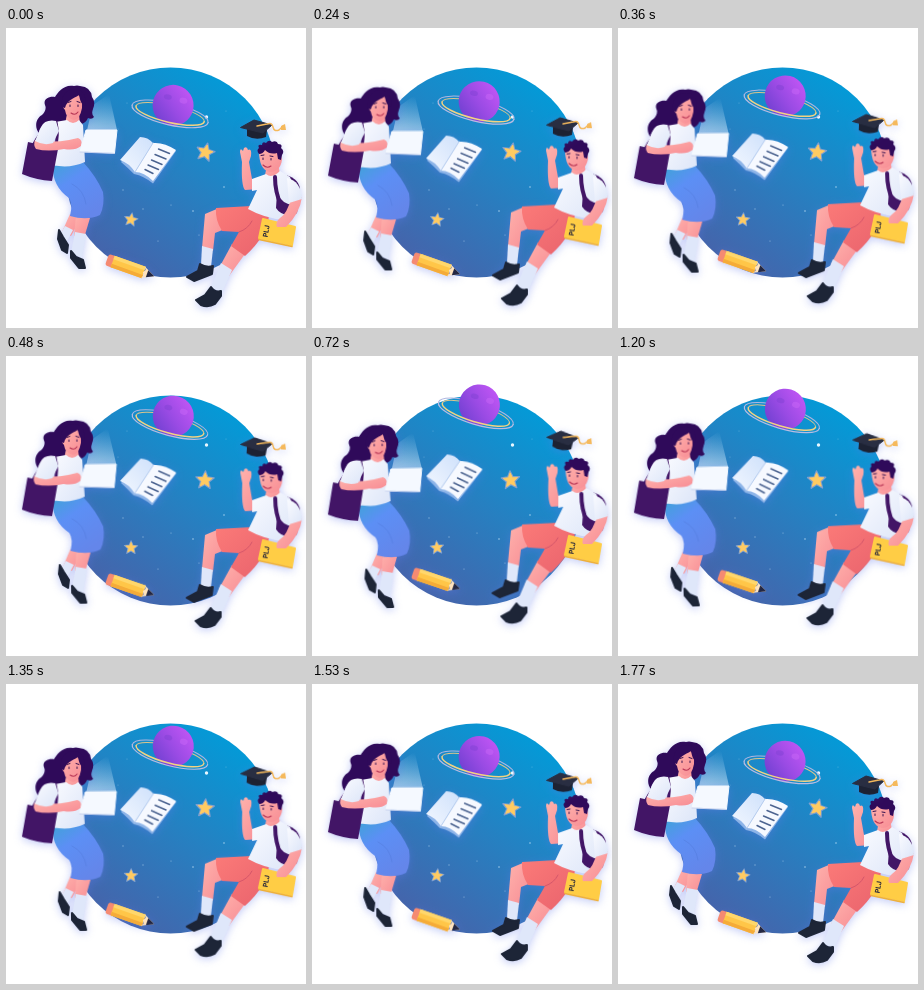
These frames come from a looping animation (300x300 px, 1.8 s). An HTML page:

```html
<!DOCTYPE html>
<html lang="en">
<head>
<meta charset="utf-8">
<title>Floating students</title>
<style>
html, body { margin: 0; width: 100%; height: 100%; overflow: hidden; background: #fff; }
svg { display: block; width: 100vw; height: 100vh; }
.glow { filter: drop-shadow(0 2px 4px rgba(96, 120, 235, .38)); }
.line { fill: none; stroke-linecap: round; stroke-linejoin: round; }
.ink { stroke: #34104f; stroke-width: 1; }
.skin { fill: url(#skin); }
.shoe { fill: #1d2537; stroke: #1d2537; stroke-width: 2; stroke-linejoin: round; }
.sock { fill: #dfe7fa; }
.shirt { fill: url(#cloth); }
.hair { fill: #2f0a5a; }
</style>
</head>
<body>
<svg viewBox="0 0 300 300">
  <defs>
    <linearGradient id="sky" x1=".85" y1=".1" x2=".25" y2=".95">
      <stop offset="0" stop-color="#029bd8"/><stop offset=".5" stop-color="#2680c1"/><stop offset="1" stop-color="#4564ab"/>
    </linearGradient>
    <linearGradient id="skin" x1="0" y1="0" x2="1" y2="1">
      <stop offset="0" stop-color="#ffb2ac"/><stop offset="1" stop-color="#f78c94"/>
    </linearGradient>
    <linearGradient id="cloth" x1="0" y1="0" x2="1" y2="1">
      <stop offset="0" stop-color="#fafbff"/><stop offset="1" stop-color="#dce5f8"/>
    </linearGradient>
    <linearGradient id="skirt" x1="0" y1="0" x2=".6" y2="1">
      <stop offset="0" stop-color="#3fa3d8"/><stop offset=".4" stop-color="#5c8ff5"/><stop offset="1" stop-color="#6486ea"/>
    </linearGradient>
    <linearGradient id="shorts" x1="0" y1="0" x2="1" y2="1">
      <stop offset="0" stop-color="#fb7a78"/><stop offset="1" stop-color="#e9636d"/>
    </linearGradient>
    <linearGradient id="orb" x1=".15" y1=".9" x2=".8" y2=".15">
      <stop offset="0" stop-color="#7341d2"/><stop offset=".5" stop-color="#9a4be4"/><stop offset="1" stop-color="#bb54f2"/>
    </linearGradient>
    <linearGradient id="page" x1="0" y1="1" x2="1" y2="0">
      <stop offset="0" stop-color="#f2f7ff"/><stop offset="1" stop-color="#cfe1fb"/>
    </linearGradient>
    <linearGradient id="beam" x1=".4" y1="1" x2=".55" y2="0">
      <stop offset="0" stop-color="#dff3ff" stop-opacity=".6"/><stop offset="1" stop-color="#bfe4fa" stop-opacity="0"/>
    </linearGradient>
    <g id="star" stroke-linejoin="round">
      <path id="starShape" d="M0-9 2.6-3.1 9-2.6 4.2 1.7 5.6 8 0 4.7-5.6 8-4.2 1.7-9-2.6-2.6-3.1Z" fill="#7f9fce" stroke="#7f9fce" stroke-width="1.5"/>
      <path transform="scale(.8)" d="M0-9 2.6-3.1 9-2.6 4.2 1.7 5.6 8 0 4.7-5.6 8-4.2 1.7-9-2.6-2.6-3.1Z" fill="#ffcb62" stroke="#ffcb62"/>
    </g>
  </defs>

  <circle cx="164.500" cy="144.500" r="105" fill="url(#sky)"/>
  <g id="specks" fill="#d6efff"></g>
  <circle cx="200.500" cy="89" r="1.700" fill="#e8f7ff"/>

  <g id="planet">
    <path class="line" d="M126 86A39 11 0 0 1 204 86" stroke="#aeb6e0"/>
    <path class="line" d="M130 86A35 8.500 0 0 1 200 86" stroke="#d9c48d"/>
    <circle cx="166" cy="77" r="20.500" fill="url(#orb)"/>
    <ellipse cx="159" cy="70" rx="4" ry="2.600" fill="#7a3fd0" opacity=".4"/>
    <ellipse cx="175" cy="70" rx="4" ry="3" fill="#d06bfa" opacity=".4"/>
    <path class="line" d="M126 86A39 11 0 0 0 204 86" stroke="#b9bce2" stroke-width="1.200"/>
    <path class="line" d="M130 86A35 8.500 0 0 0 200 86" stroke="#f2d382" stroke-width="1.500"/>
  </g>

  <g id="bigStar"><use href="#star" x="199.500" y="124"/></g>
  <g id="smallStar"><use href="#star" transform="translate(125 191.500) scale(.74)"/></g>

  <g id="notebook" class="glow">
    <path d="M115 134 134 111Q140 110 146 116 157 116 170 123L147 155.500Q138 148 128 146 121 139 115 134Z" fill="#8db4e8"/>
    <path d="M114 132 134 109Q142 109 147 115L129 144Q123 135 114 132Z" fill="url(#page)"/>
    <path d="M147 115Q158 114 170 122L147 153Q138 144 129 144Z" fill="#f6f9ff"/>
    <path class="line" d="M147 115 129 144" stroke="#b7cdef"/>
    <path class="line" d="M152.500 121 163.500 125.500M149 126.500 160 131M145.500 132 156 136.500M142 137 152.500 141.500M139 141.500 147 145.500" stroke="#4a628f" stroke-width="1.400"/>
  </g>

  <g id="pencil" class="glow">
    <g transform="translate(101 231.500) rotate(19.500)">
      <rect y="-6" width="10" height="12" rx="2.500" fill="#f58a72"/>
      <path d="M6-6H39V6H6Z" fill="#ffc648"/>
      <path d="M6-6H39V-2.500H6Z" fill="#ffd76c"/>
      <path d="M6 2.500H39V6H6Z" fill="#f5ab38"/>
      <path d="M38-6 50 0 38 6 40 3 38 0 40-3Z" fill="#ffe3bd"/>
      <path d="M42.500-3.700 50 0 42.500 3.700Z" fill="#232743"/>
    </g>
  </g>

  <g id="girl">
    <path d="M81 102 87 77 103 66 111 102Z" fill="url(#beam)"/>
    <g class="glow">
      <path class="hair" d="M68 58C58 56 52 64 49 69 42 68 37 72 39 77 41 81 38 85 36 87 30 90 28 99 33 105 33 100 37 98 41 97 48 101 55 100 61 97L75 96Q80 95 82 90 86 92 88 89 85 86 87 81 90 74 86 69 85 59 74 58 71 57 68 58Z"/>
      <path class="skin" d="M64 186 75 190 65 208 56 204Z"/>
      <path class="sock" d="M59 198 67 202 61 213 54 207Z"/>
      <path class="shoe" d="M53 202 57 209 62 217 61 225 56 222 52 211Z"/>
      <path class="skin" d="M70 187 84 190 78 210 68 208Z"/>
      <path class="sock" d="M69 204 80 206 76 230 65 225Z"/>
      <path class="shoe" d="M65 223 70 229 77 232 79 240 73 240 65 230Z"/>
      <path d="M47 138 77 134Q90 148 97 164 99 177 94 187 81 193 64 188 67 176 63 170 46 158 47 138Z" fill="url(#skirt)"/>
      <path class="line" d="M66 156Q78 162 80 176" stroke="#5078d8" opacity=".45"/>
      <path class="skin" d="M61 86H73L74 97 66 101 59 96Z"/>
      <path class="shirt" d="M49 94 61 92Q67 98 73 92L77 97 79 134Q63 141 47 137L50 116Z"/>
      <path d="M22 114 52 121 46 153Q30 152 16 146Z" fill="#421566"/>
      <path class="line" d="M50 94Q53 107 49 121M43 99Q34 104 28 116" stroke="#421566" stroke-width="3"/>
      <path class="skin" d="M29 112Q46 115 63 112L72 110Q77 112 75 118 69 123 58 121 42 124 30 121 27 117 29 112Z"/>
      <path class="shirt" d="M50 93Q39 91 35 99L29 113Q38 118 47 115L53 103Z"/>
      <path class="skin" d="M59 72Q62 64 71 66 77 69 76 80 74 91 68 92 60 90 59 82 55 78 59 72Z"/>
      <path class="hair" d="M56 79C54 67 62 60 70 61 80 63 80 72 79 78 75 76 74 72 73 67 67 71 61 72 59 80Z"/>
      <path class="line ink" d="M64 77V78.500M72 77V78.500M62 74.500 65 73.500M71 73.500 74 74.500"/>
      <path class="line" d="M65 85Q69 88 72 84" stroke="#b83656" stroke-width="1.100"/>
      <path d="M80 102 111 102 108.500 125 74 123.500Z" fill="#f5f9ff" stroke="#f5f9ff" stroke-linejoin="round"/>
      <path class="line" d="M74 124 108.500 125.500" stroke="#c8d3ef"/>
    </g>
  </g>

  <g id="boy" class="glow">
    <path class="skin" d="M226 216 239 226 223 248 213 240Z"/>
    <path class="sock" d="M215 235 226 242 216 265 205 259Z"/>
    <path class="shoe" d="M205 259Q209 265 215 263L215 268 209 276Q202 280 195 277L190 272 199 267Z"/>
    <path class="skin" d="M199 186 213 180 219 201 209 205 207 223 196 220Z"/>
    <path class="sock" d="M196 218 207 221 205 239 195 237Z"/>
    <path class="shoe" d="M194 236Q200 240 207 238L206 246 188 253 181 249 192 243Z"/>
    <path d="M245 178 263 187Q262 207 239 228L225 218 233 204 216 203Q209 192 210 180Z" fill="url(#shorts)"/>
    <path class="line" d="M233 204Q242 201 246 193" stroke="#d4566a"/>
    <path class="skin" d="M236 134 234 124Q234 119 237 123L238 120Q241 118 242 122 246 120 245 128L243 134 246 151 257 151 255 161 239 162Q235 158 236 134Z"/>
    <path d="M280 147Q294 151 294 163L291 185Q283 190 276 185Z" fill="#421566"/>
    <path class="skin" d="M261 137 272 134 274 147 266 151 259 147Z"/>
    <path class="shirt" d="M246 151 260 146Q266 151 274 143L284 149 290 165 278 192Q258 190 242 181L251 162 246 163Z"/>
    <path class="line" d="M269 149Q269 164 275 177" stroke="#421566" stroke-width="4"/>
    <path d="M271 165Q276 176 287 177L286 187Q275 188 270 180Z" fill="#421566"/>
    <path d="M257 191 289 199 286 217 253 210Z" fill="#ffcd45" stroke="#ffcd45" stroke-width="2" stroke-linejoin="round"/>
    <path class="line" d="M253 211.500 286 218.500" stroke="#eeaf39" stroke-width="1.500"/>
    <text transform="translate(261.500 209.500) rotate(-80)" font-family="Inter, 'Liberation Sans', sans-serif" font-size="6.800" font-weight="700" fill="#20213a">PLJ</text>
    <path class="skin" d="M286 168 296 169Q294 185 280 199L271 199Q269 194 274 190 281 186 286 168Z"/>
    <path class="shirt" d="M281 150Q295 153 296 171L283 175Z"/>
    <path class="skin" d="M253 123Q260 117 274 122L276 132Q274 144 264 144 253 142 253 123Z"/>
    <path class="hair" d="M253 126Q250 122 253 120 251 116 256 117 256 113 260 115 263 111 266 114 271 112 272 116 277 116 275 120 279 123 276 127L275 132 272 131 271 125Q264 127 259 122 257 126 253 126Z"/>
    <path class="line ink" d="M257 130V131.500M265 130.500V132M255 127.500 258 127M264 128 267 128.500"/>
    <path class="line" d="M257 137Q261 141 265 138" stroke="#b83656" stroke-width="1.100"/>
  </g>

  <g id="cap" class="glow">
    <path d="M241 99 261 102 260 109Q250 113 241 108Z" fill="#1d2233"/>
    <path d="M234.500 99.500 248 92 266 97 257 105Z" fill="#292e42" stroke="#292e42" stroke-linejoin="round"/>
    <path class="line" d="M251 98 261 96Q266 94 267 99T273 102L277 98" stroke="#f5b95c" stroke-width="1.400"/>
    <path d="M275 98 279 96 280 102 275 102Z" fill="#f5b95c"/>
  </g>
</svg>
<script>
const LOOP = 1800, STEP = 30;
const el = id => document.getElementById(id);

// Each part drifts and tilts between rest and its far pose.
const parts = [
  { id: "planet", x: 165, y: 82, rise: -30.5, from: 13, to: 17 },
  { id: "bigStar", x: 199.5, y: 124, shift: -1, rise: 0, from: 14, to: -5 },
  { id: "smallStar", x: 125, y: 191.5, rise: 0, from: 10, to: -6 },
  { id: "notebook", x: 141, y: 132, rise: -11, from: 0, to: 3 },
  { id: "pencil", x: 124, y: 239, rise: -16, from: 0, to: -1 },
  { id: "girl", x: 70, y: 150, rise: 12, from: 0, to: -1.5 },
  { id: "boy", x: 245, y: 195, rise: -12, from: 0, to: .5 },
  { id: "cap", x: 253, y: 101, rise: -17.5, from: 0, to: 6 }
].map(part => ({ ...part, node: el(part.id) }));

const specks = [[117, 162], [152, 213], [112, 101], [187, 183], [220, 83], [165, 177], [137, 181], [193, 207], [121, 75], [218, 159]];
el("specks").innerHTML = specks.map(([x, y], i) =>
  `<circle cx="${x}" cy="${y}" r="${i % 3 ? .5 : .8}" opacity="${i % 2 ? .7 : .4}"/>`).join("");

// cubic-bezier(.5, 0, .5, 1), solved for its parameter by bisection
function ease(x) {
  let low = 0, high = 1;
  for (let i = 0; i < 24; i++) {
    const u = (low + high) / 2;
    if (1.5 * u * (1 - u) + u ** 3 < x) low = u;
    else high = u;
  }
  return low * low * (3 - 2 * low);
}

function draw(ms) {
  const phase = Math.floor((ms % LOOP) / STEP) * STEP / LOOP;
  const k = ease(1 - Math.abs(1 - 2 * phase));
  for (const { node, x, y, shift = 0, rise, from, to } of parts) {
    const angle = from + (to - from) * k;
    node.setAttribute("transform", `translate(${shift * k} ${rise * k}) rotate(${angle} ${x} ${y})`);
  }
}

const start = performance.now();
function tick() {
  draw(performance.now() - start);
  requestAnimationFrame(tick);
}
tick();
</script>
</body>
</html>
```
